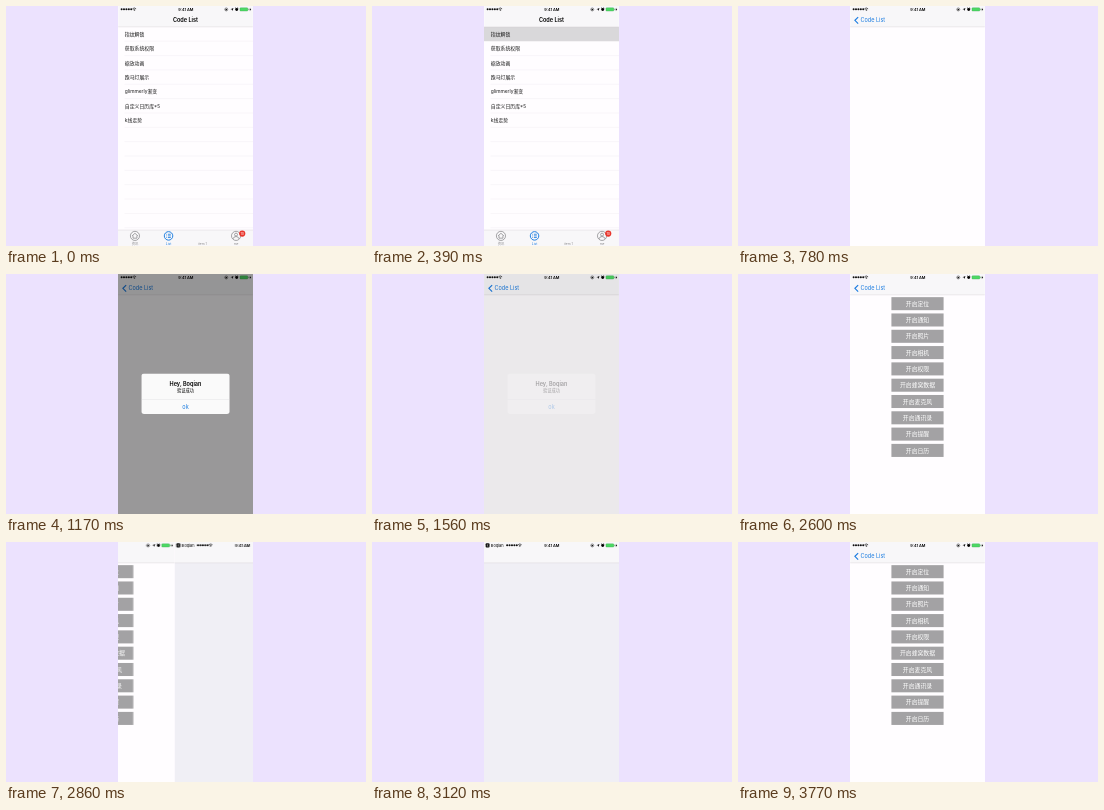
An HTML page that plays this animation: 360x240 px, repeating every 3.9 s.

```html
<!DOCTYPE html>
<html>
<head>
<meta charset="utf-8">
<title>Code List demo</title>
<style>
  html, body { margin: 0; width: 100%; height: 100%; overflow: hidden; background: #ece2fe; }
  svg { display: block; }
  #stage { width: 100vw; height: 100vh; }
  text { font-family: Inter, "Noto Sans CJK SC", "Noto Sans CJK", sans-serif; font-size: 17px; }
  .mid { text-anchor: middle; }
  .bold { font-weight: 600; }
  .blue { fill: #1b7ce0; }
  .row { font-size: 15px; fill: #1a1a1a; }
  .btn { font-size: 18px; fill: #fff; }
  .tab { font-size: 10px; fill: #8f8f92; }
  .small { font-size: 12px; }
  .line { stroke: #e9e7ec; }
  .edge { stroke: #c6c4ca; }
  .icon { fill: none; stroke: #77777a; stroke-width: 2; }

  /* One loop is 30 ticks of 130 ms; every pose is held for whole ticks. */
  .move { animation: 3900ms step-end infinite; }
  #app { animation-name: app; }
  #settings { animation-name: settings; }
  #list { animation-name: list; }
  #lock { animation-name: lock; }
  #access { animation-name: access; }
  #title { animation-name: title; }
  #back { animation-name: back; }
  #dim { animation-name: dim; }
  #alert { animation-name: alert; }
  #tap0 { animation-name: tap0; }
  #tap1 { animation-name: tap1; }

  @keyframes list {
    0%, 49.99% { transform: translateX(0); }
    13.33%, 59.99% { transform: translateX(-73px); }
    16.66%, 63.33% { transform: translateX(-112px); }
    19.99%, 66.66%, 100% { transform: translateX(-124px); }
    43.33% { transform: translateX(-64px); }
    46.66% { transform: translateX(-13px); }
  }
  @keyframes lock {
    0%, 49.99%, 100% { transform: translateX(414px); }
    13.33% { transform: translateX(170px); }
    16.66% { transform: translateX(40px); }
    19.99% { transform: translateX(0); }
    43.33% { transform: translateX(200px); }
    46.66% { transform: translateX(370px); }
  }
  @keyframes access {
    0% { transform: translateX(414px); }
    59.99% { transform: translateX(170px); }
    63.33% { transform: translateX(40px); }
    66.66%, 100% { transform: translateX(0); }
  }
  @keyframes title {
    0%, 49.99% { opacity: 1; transform: translateX(0); }
    13.33%, 59.99% { opacity: .4; transform: translateX(-82px); }
    16.66%, 63.33% { opacity: .1; transform: translateX(-125px); }
    19.99%, 66.66%, 100% { opacity: 0; transform: translateX(-138px); }
    43.33% { opacity: .5; transform: translateX(-70px); }
    46.66% { opacity: .9; transform: translateX(-15px); }
  }
  @keyframes back {
    0%, 49.99% { opacity: 0; transform: translateX(138px); }
    13.33%, 59.99% { opacity: .6; transform: translateX(56px); }
    16.66%, 63.33% { opacity: .9; transform: translateX(13px); }
    19.99%, 66.66%, 100% { opacity: 1; transform: translateX(0); }
    43.33% { opacity: .5; transform: translateX(68px); }
    46.66% { opacity: .1; transform: translateX(123px); }
  }
  @keyframes dim {
    0%, 43.33%, 100% { opacity: 0; }
    26.66% { opacity: .2; }
    29.99% { opacity: .4; }
    39.99% { opacity: .08; }
  }
  @keyframes alert {
    0%, 43.33%, 100% { opacity: 0; }
    26.66% { opacity: .5; }
    29.99% { opacity: 1; }
    39.99% { opacity: .3; }
  }
  @keyframes tap0 {
    0%, 19.99%, 100% { opacity: 0; }
    6.66% { opacity: 1; }
  }
  @keyframes tap1 {
    0%, 66.66%, 100% { opacity: 0; }
    53.33% { opacity: 1; }
  }
  @keyframes app {
    0%, 96.66%, 100% { transform: translateX(0); }
    73.33% { transform: translateX(-240px); }
    76.66% { transform: translateX(-390px); }
    79.99% { transform: translateX(-414px); }
    89.99% { transform: translateX(-170px); }
    93.33% { transform: translateX(-30px); }
  }
  @keyframes settings {
    0%, 96.66%, 100% { transform: translateX(414px); }
    73.33% { transform: translateX(174px); }
    76.66% { transform: translateX(24px); }
    79.99% { transform: translateX(0); }
    89.99% { transform: translateX(244px); }
    93.33% { transform: translateX(384px); }
  }
</style>
</head>
<body>
<svg id="stage" viewBox="0 0 360 240">
  <defs>
    <g id="signal">
      <path d="M11 10H41" stroke="#111" stroke-width="6.4" stroke-linecap="round" stroke-dasharray="0 7.4"/>
      <path d="M44.500 8.500a8 8 0 0 1 11 0M47 11.500a4.500 4.500 0 0 1 6 0" fill="none" stroke="#111" stroke-width="2"/>
      <circle cx="50" cy="14" r="1.500"/>
    </g>
    <g id="status">
      <text class="mid bold small" x="208" y="15">9:41 AM</text>
      <circle cx="332" cy="10.500" r="4.500" fill="none" stroke="#222" stroke-width="1.500"/>
      <rect x="330" y="9" width="4" height="4"/>
      <path d="M354 6L351 15L349.500 11L345 10Z"/>
      <circle cx="364" cy="11" r="4.500"/>
      <path d="M359 7L362 5M369 7L366 5" stroke="#111" stroke-width="2"/>
      <rect x="374" y="5.500" width="24" height="10" rx="2" fill="#4cd964" stroke="#3c9c4c"/>
      <path d="M399.500 8.500v4" stroke="#3c9c4c" stroke-width="2"/>
      <path d="M406 5L402.500 11H405L404 16L408.500 9.500H405.500Z"/>
    </g>
    <g id="bar">
      <rect width="414" height="64" fill="#f8f7f9"/>
      <path class="edge" d="M0 64H414"/>
    </g>
  </defs>

  <svg x="112" width="135" height="240" viewBox="0 0 414 736" preserveAspectRatio="none">
    <rect width="414" height="736" fill="#fffdff"/>

    <g id="app" class="move">
      <g id="list" class="move">
        <rect width="414" height="736" fill="#fffdff"/>
        <rect id="tap0" class="move" y="64" width="414" height="44" fill="#d9d8da"/>
        <rect id="tap1" class="move" y="108" width="414" height="44" fill="#d9d8da"/>
        <g id="rows"></g>
        <rect y="687" width="414" height="49" fill="#f8f7f9"/>
        <path class="edge" d="M0 687H414"/>
        <circle class="icon" cx="52" cy="705" r="14"/>
        <path class="icon" d="M43 705L52 697L61 705M46 704V712H58V704"/>
        <text class="tab mid" x="52" y="732">资讯</text>
        <circle class="icon" cx="155" cy="705" r="13" style="stroke:#1b7ce0;stroke-width:3"/>
        <path d="M148 700H150M153 700H162M148 705H150M153 705H162M148 710H150M153 710H162" stroke="#1b7ce0" stroke-width="2.500"/>
        <text class="tab mid" x="155" y="732" style="fill:#1b7ce0">List</text>
        <text class="tab mid" x="259" y="732">item 1</text>
        <circle class="icon" cx="362" cy="705" r="14"/>
        <circle class="icon" cx="362" cy="701" r="4.500"/>
        <path class="icon" d="M353 714Q354 707 362 707T371 714"/>
        <text class="tab mid" x="362" y="732">me</text>
        <circle cx="381" cy="698" r="9.500" fill="#e8352c"/>
        <text class="mid" x="381" y="702" style="font-size:11px" fill="#fff">10</text>
      </g>

      <rect id="lock" class="move" width="414" height="736" fill="#fffdff"/>

      <g id="access" class="move">
        <rect width="414" height="736" fill="#fffdff"/>
        <g id="buttons"></g>
      </g>

      <use href="#bar"/>
      <text id="title" class="move mid bold" x="207" y="50">Code List</text>
      <g id="back" class="move">
        <path d="M25 34L15 44L25 54" fill="none" stroke="#1b7ce0" stroke-width="3.500"/>
        <text class="blue" x="32" y="50">Code List</text>
      </g>
      <use href="#signal"/>
      <use href="#status"/>

      <rect id="dim" class="move" width="414" height="736"/>
      <g id="alert" class="move">
        <rect x="72" y="305" width="270" height="124" rx="8" fill="#fafafa"/>
        <path d="M72 385H342" stroke="#d5d5d8"/>
        <text class="mid bold" x="207" y="343">Hey, Boqian</text>
        <text class="mid" x="207" y="363" style="font-size:13px">验证成功</text>
        <text class="mid blue" x="207" y="415">ok</text>
      </g>
    </g>

    <g id="settings" class="move">
      <rect width="414" height="736" fill="#f0eff5"/>
      <use href="#bar"/>
      <rect x="5" y="4" width="12" height="13" rx="3" fill="#111"/>
      <path d="M13 7L9 10.500L13 14" fill="none" stroke="#fff" stroke-width="1.500"/>
      <text class="small" x="21" y="15">Boqian</text>
      <use href="#signal" x="60"/>
      <use href="#status"/>
    </g>
  </svg>
</svg>

<script>
  const rows = ["指纹解锁", "获取系统权限", "缩放动画", "跑马灯展示", "glimmerly渐变", "自定义日历库*5", "k线走势"];
  const grants = ["定位", "通知", "照片", "相机", "权限", "蜂窝数据", "麦克风", "通讯录", "提醒", "日历"];
  const fill = (id, items, draw) => {
    document.getElementById(id).innerHTML = items.map(draw).join("");
  };

  // The separators continue below the last filled row.
  fill("rows", Array.from({ length: 14 }, (_, i) => rows[i] || ""), (label, i) => {
    const y = 64 + 44 * i;
    return `<text class="row" x="21" y="${y + 28}">${label}</text>
      <path class="line" d="M20 ${y + 44}H414"/>`;
  });

  fill("buttons", grants, (label, i) => {
    const y = 71 + 50 * i;
    return `<rect x="127" y="${y}" width="160" height="40" fill="#a3a2a4"/>
      <text class="btn mid" x="207" y="${y + 26.5}">开启${label}</text>`;
  });
</script>
</body>
</html>
```
